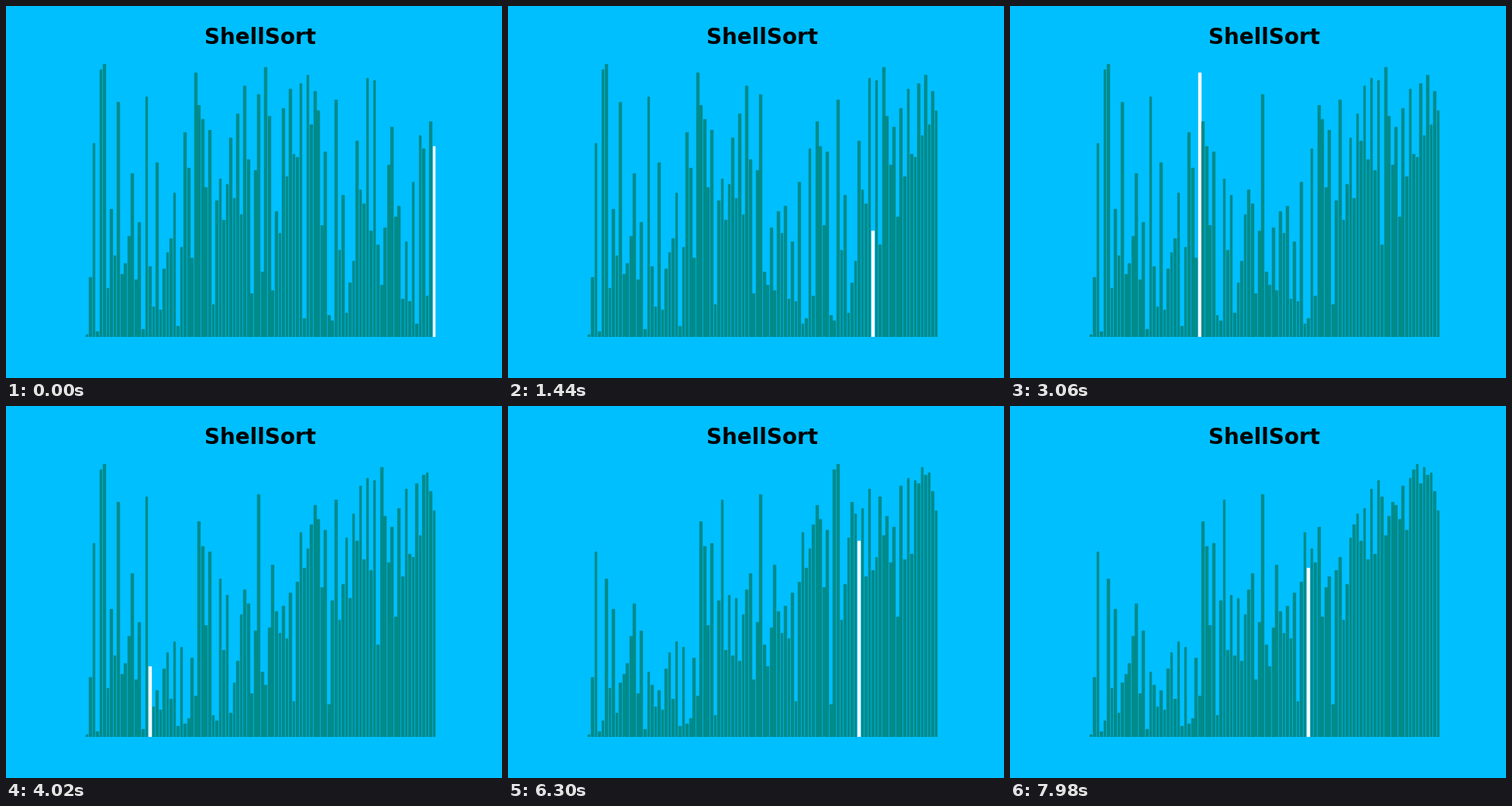
Animation, 640 px wide and 480 px high, one loop 8000 ms. Source, as a matplotlib script:

```python
import numpy as np
import matplotlib.pyplot as plt
from matplotlib.animation import FuncAnimation
from matplotlib.collections import PolyCollection

TICK = 20            # ms per animation frame
HOLD = 3             # ticks per sorting step
TICKS = 400
WIDTH = 0.6
BAR, MARK, SKY = "darkcyan", "white", "deepskyblue"

VALUES = [
    1, 22, 71, 2, 98, 100, 18, 47, 30, 86, 23, 27, 37, 60, 21, 42, 3, 88, 26, 11,
    64, 10, 25, 31, 36, 53, 4, 33, 75, 62, 29, 97, 85, 80, 55, 76, 12, 50, 58, 43,
    56, 73, 51, 82, 45, 92, 65, 16, 61, 89, 24, 99, 81, 17, 46, 38, 84, 59, 91, 67,
    66, 93, 7, 96, 78, 90, 83, 41, 68, 8, 6, 87, 32, 52, 9, 20, 28, 72, 54, 49,
    95, 39, 94, 34, 19, 40, 63, 77, 44, 48, 14, 35, 13, 57, 5, 74, 69, 15, 79, 70,
]
N = len(VALUES)


def shell_sort(values):
    """Yield (array, marked index) for both sides of every shift."""
    a = list(values)
    gap = N // 3
    while gap:
        for start in range(N - gap - 1, -1, -1):
            held, j = a[start], start
            while j + gap < N and held > a[j + gap]:
                yield a[:], j
                yield a[:], j + gap
                a[j] = a[j + gap]
                j += gap
            a[j] = held
        gap //= 3


steps = list(shell_sort(VALUES))[1:]

fig = plt.figure(figsize=(6.4, 4.8), dpi=100, facecolor=SKY)
ax = fig.add_subplot()
ax.axis("off")
ax.set_title("ShellSort", fontsize=20, fontweight="bold",
             fontfamily="DejaVu Sans", color="black")

span = N - 1 + WIDTH
ax.set_xlim(-WIDTH / 2 - 0.05 * span, N - 1 + WIDTH / 2 + 0.05 * span)
ax.set_ylim(0, 1.05 * N)

corners = np.zeros((N, 4, 2))
left = np.arange(N) - WIDTH / 2
corners[:, :2, 0] = left[:, None]
corners[:, 2:, 0] = left[:, None] + WIDTH

bars = PolyCollection(corners, linewidths=1, joinstyle="miter")
ax.add_collection(bars, autolim=False)


def draw(tick):
    heights, marked = steps[tick // HOLD]
    corners[:, 1:3, 1] = np.array(heights)[:, None]
    colors = [BAR] * N
    colors[marked] = MARK
    bars.set_verts(corners.copy())
    bars.set_color(colors)
    return [bars]


anim = FuncAnimation(fig, draw, frames=TICKS, interval=TICK,
                     init_func=lambda: draw(0), repeat=True, repeat_delay=0)
plt.show()
```
